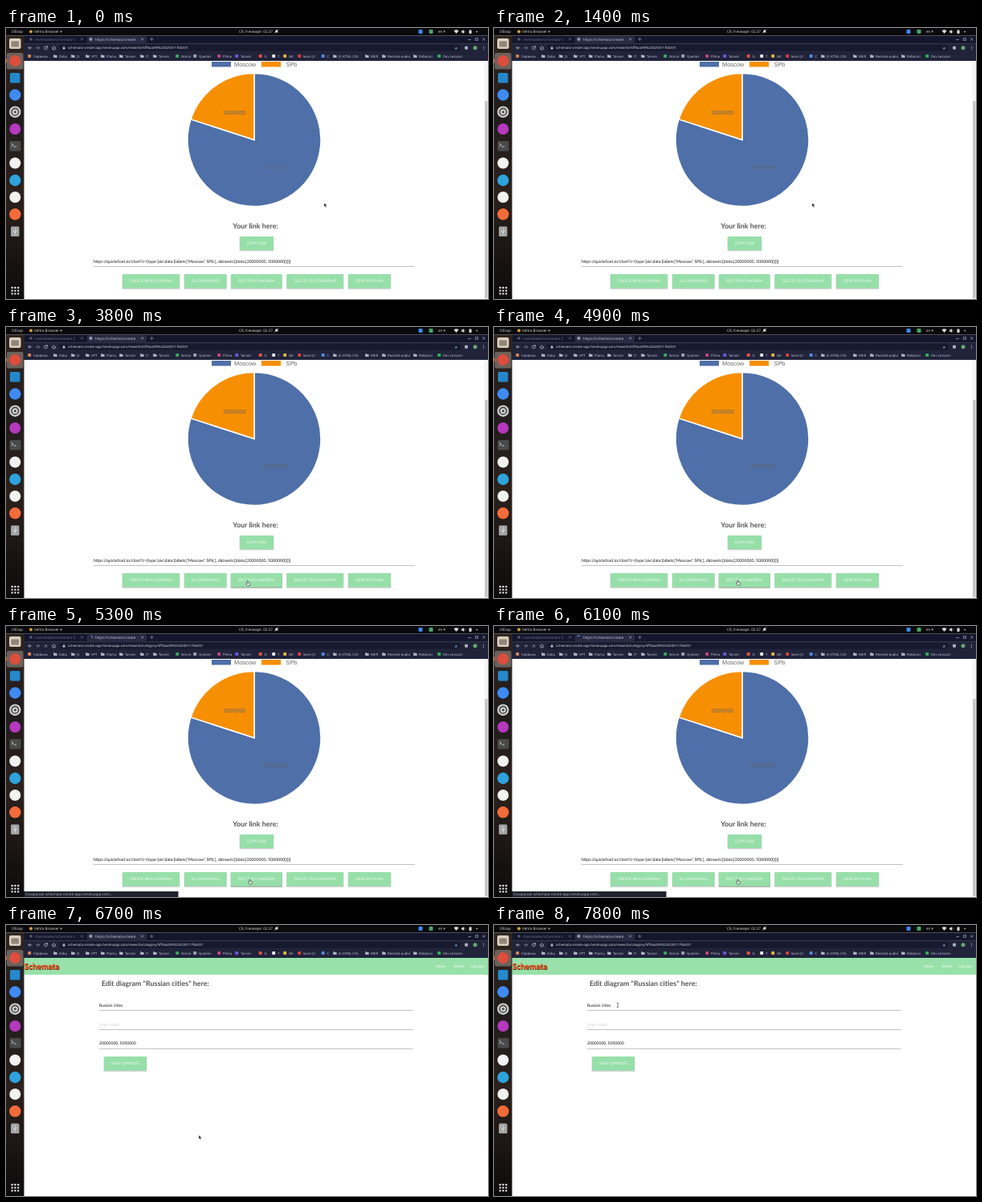
An HTML page that plays this animation: 600x338 px, repeating every 8 s.

```html
<!DOCTYPE html>
<html lang="ru">
<head>
<meta charset="utf-8">
<title>Chart editor</title>
<style>
  html, body { margin: 0; width: 100%; height: 100%; overflow: hidden; background: #fff; }
  svg { display: block; width: 600px; height: 338px; }
  text { font-family: "Open Sans", sans-serif; text-rendering: geometricPrecision; white-space: pre; }
  .lato { font-family: Lato, sans-serif; }
  .arial { font-family: "Liberation Sans", sans-serif; }
</style>
</head>
<body>
<svg id="stage" viewBox="0 0 600 338" xmlns="http://www.w3.org/2000/svg">
  <defs>
    <linearGradient id="wall" x2="0" y2="1">
      <stop offset="0" stop-color="#30251f"/>
      <stop offset=".3" stop-color="#211c1d"/>
      <stop offset=".6" stop-color="#2c211c"/>
      <stop offset="1" stop-color="#0c0b0c"/>
    </linearGradient>
    <clipPath id="view"><rect x="22" y="41" width="578" height="297"/></clipPath>
  </defs>
  <rect width="600" height="338" fill="#fff"/>
  <g id="chart" clip-path="url(#view)"></g>
  <g id="form" clip-path="url(#view)"></g>
  <g id="status"></g>
  <g id="browser"></g>
  <g id="dock"></g>
  <g id="cursor">
    <path id="arrow" d="M0 0V5.2L1.2 4.1L2 6L3 5.6L2.2 3.8H3.8Z" fill="#111" stroke="#fff" stroke-width=".5"/>
    <path id="beam" d="M-1.2-2.8Q0-2.8 0-2V2Q0 2.8-1.2 2.8M1.2-2.8Q0-2.8 0-2M0 2Q0 2.8 1.2 2.8" fill="none" stroke="#222" stroke-width=".6"/>
    <path id="hand" d="M-1.2-2.6Q-.6-3.4 0-2.6V-.7L2-.2Q2.6 0 2.5.8L2 3H-1L-2.6.8Q-2.4 0-1.2.6Z" fill="#fff" stroke="#222" stroke-width=".6"/>
  </g>
</svg>
<script>
const LOOP = 8000, STEP = 100;
const LOAD = 5000, OPEN = 6200, LEAVE = 6400;
const $ = id => document.getElementById(id);

function add(parent, tag, attrs, content) {
  const el = document.createElementNS("http://www.w3.org/2000/svg", tag);
  for (const key in attrs) el.setAttribute(key, attrs[key]);
  if (content) el.textContent = content;
  return parent.appendChild(el);
}
const rect = (p, x, y, width, height, fill, rx = 0) => add(p, "rect", { x, y, width, height, fill, rx });
const dot = (p, cx, cy, r, fill) => add(p, "circle", { cx, cy, r, fill });
const line = (p, d, stroke, width = .7) =>
  add(p, "path", { d, stroke, fill: "none", "stroke-width": width, "stroke-linecap": "round" });
const text = (p, x, y, size, fill, str, more = {}) =>
  add(p, "text", { x, y, "font-size": size, fill, ...more }, str);
const lato = (p, x, y, size, fill, str, more = {}) =>
  text(p, x, y, size, fill, str, { class: "lato", ...more });
const bold = { "font-weight": 700 };
const middle = { "text-anchor": "middle" };

function button(p, x, y, w, h, label) {
  const shadow = rect(p, x - .4, y + .5, w + .8, h + .7, "#9aa89e", 1);
  shadow.setAttribute("opacity", .55);
  rect(p, x, y, w, h, "#97dfa9", .8);
  lato(p, x + w / 2, y + h / 2 + 1.7, 4.8, "#f0fbf3", label, middle);
  return shadow;
}

// Chart page
const chart = $("chart");
const BLUE = "#4e6fa8", ORANGE = "#f78f02";
rect(chart, 256, 42, 24, 6.5, BLUE);
rect(chart, 318, 42, 24, 6.5, ORANGE);
text(chart, 284, 48, 7.4, "#666", "Moscow", { class: "arial" });
text(chart, 348.5, 48, 7.4, "#666", "SPb", { class: "arial" });

const CX = 309, CY = 139.5, R = 83;
function slice(from, to, fill) {
  const at = a => [CX + R * Math.cos(a * Math.PI / 180), CY + R * Math.sin(a * Math.PI / 180)].join(" ");
  const d = `M${CX} ${CY}L${at(from)}A${R} ${R} 0 ${+(to - from > 180)} 1 ${at(to)}Z`;
  add(chart, "path", { d, fill, stroke: "#fff", "stroke-width": 1.5 });
}
slice(-90, 198, BLUE);
slice(198, 270, ORANGE);
text(chart, 284.5, 108.2, 7.2, "#666", "5000000", { class: "arial", ...middle });
const bigLabel = text(chart, 335, 175.8, 7.2, "#626770", "20000000", { class: "arial", ...middle });

lato(chart, 310.5, 250, 8.9, "#545454", "Your link here:", { ...bold, ...middle });
button(chart, 291, 260, 42, 17, "COPY LINK");
lato(chart, 109, 292.5, 5.15, "#111",
  "https://quickchart.io/chart?c={type:'pie',data:{labels:['Moscow',' SPb',], datasets:[{data:[20000000, 5000000]}]}}");
rect(chart, 109, 297.2, 400, .7, "#a5a5a5");
button(chart, 145, 307, 71, 17.5, "CREATE NEW DIAGRAM");
button(chart, 222, 307, 52.5, 17.5, "ALL DRAWINGS");
const editShadow = button(chart, 280, 307, 63.5, 17.5, "EDIT THIS DIAGRAM");
button(chart, 349.5, 307, 70.5, 17.5, "DELETE THIS DIAGRAM");
button(chart, 426, 307, 53, 17.5, "SEND BY EMAIL");
rect(chart, 595.5, 41, 4.5, 297, "#f4f4f4");
rect(chart, 596.2, 91, 3.2, 246, "#c3c3c5");

// Form page
const form = $("form");
rect(form, 22, 41, 578, 297, "#fff");
rect(form, 22, 41, 578, 21, "#98e1aa");
lato(form, 23.3, 55.6, 10, "#57200c", "Schemata", bold);
lato(form, 22.7, 55, 10, "#fb4a12", "Schemata", bold);
[[534.5, "Home"], [557, "Admin"], [579, "Log Out"]].forEach(([x, s]) => lato(form, x, 53, 4.7, "#fff", s));
lato(form, 119, 75.5, 8.9, "#545454", 'Edit diagram "Russian cities" here:', bold);
[["Russian cities", "#111"], ["Enter labels", "#cfcfcf"], ["20000000, 5000000", "#111"]].forEach(([s, fill], i) => {
  lato(form, 116, 101.8 + i * 23.8, 5, fill, s);
  rect(form, 116, 106.3 + i * 23.8, 390.5, .7, "#a3a3a3");
});
button(form, 122, 164, 53, 17.5, "SAVE CHANGES");

// Status line
const HOST = "schemata-create-app.herokuapp.com";
const status = $("status");
rect(status, 22, 331, 192.5, 7, "#20222f");
text(status, 24, 336.3, 4.6, "#a9abb5", `Ожидание ${HOST}…`);

// Desktop bar and browser frame
const ui = $("browser");
const INK = "#c9ccda";
rect(ui, 0, 0, 600, 9.5, "#0a0a0c");
text(ui, 7, 6.1, 4.6, "#ddd", "Обзор");
dot(ui, 31, 4.5, 2, "#d9a13b");
text(ui, 35, 6.1, 4.6, "#ddd", "Veltra Browser ▾");
text(ui, 311, 6.1, 4.6, "#e4e4e4", "Сб, 9 января  02:27", middle);
add(ui, "path", { d: "M334.5 5.6Q335.3 5 335.3 3.4Q337 1 338.3 3.4Q338.3 5 339 5.6Z", fill: "#ddd" });
line(ui, "M334.3 6.4L339.3 1.6", "#ddd", .5);
rect(ui, 513.5, 2, 5, 5, "#3d87ee", 1);
rect(ui, 526.5, 2, 5, 5, "#49a66b", 1);
text(ui, 538, 6.1, 4.6, "#ddd", "en ▾");
add(ui, "path", { d: "M557.5 3.4Q560.5 .9 563.5 3.4L560.5 7Z", fill: "#ddd" });
add(ui, "path", { d: "M567 3.6H568.3L570 2.2V7L568.3 5.7H567Z", fill: "#ddd" });
line(ui, "M571 3.3Q572 4.6 571 5.9", "#ddd", .5);
rect(ui, 576.5, 2.4, 3, 4.6, "#ddd", .5);
text(ui, 585, 6.1, 4.2, "#ddd", "▾");

rect(ui, 22, 9.5, 578, 10, "#14172c");
rect(ui, 101, 10.3, 74, 9.2, "#272a42", 1.4);
rect(ui, 22, 19.2, 578, 21.8, "#20233a");
rect(ui, 66, 20.8, 500, 8, "#171a2e", 4);
dot(ui, 31, 14, 1.8, "#555b70");
text(ui, 36, 15.6, 4.5, "#70768d", "melnikodev/schemata-C");
text(ui, 111, 15.6, 4.5, "#d5d7e4", "https://schemata-create");
const cross = (x, y, r, c) => line(ui, `M${x - r} ${y - r}l${2 * r} ${2 * r}m0 ${-2 * r}l${-2 * r} ${2 * r}`, c, .6);
cross(94.5, 14, 1.1, "#8b90a6");
cross(169.7, 14, 1.1, INK);
line(ui, "M179.6 14H183.2M181.4 12.2V15.8", "#9a9fb5", .6);
line(ui, "M575.5 14.6H578.5", INK, .6);
line(ui, "M584.7 12.7H587.5V15.4H584.7Z", INK, .6);
cross(594.7, 14, 1.3, INK);

const icon = add(ui, "g", {});
dot(icon, 105.5, 14, 2, "#b9bdcb");
line(icon, "M103.7 14H107.3M105.5 12.2V15.8", "#454a62", .4);
const spinner = line(ui, "M105.5 11.9A2.1 2.1 0 0 1 107.6 14", "#7ea7ee", .8);

line(ui, "M32 24.8H28M29.7 23L28 24.8L29.7 26.6", INK);
line(ui, "M37.5 24.8H41.5M39.8 23L41.5 24.8L39.8 26.6", "#8f94a8");
const reload = line(ui, "M51.2 23.8A2 2 0 1 0 51.4 25.5M51.5 22.5V24H50", INK);
const stop = cross(49.5, 24.8, 1.5, INK);
line(ui, "M57.3 25L59.6 22.8L61.9 25M58.1 24.8V26.8H61.1V24.8", INK);
rect(ui, 70.7, 24.2, 2.8, 2.3, INK, .3);
line(ui, "M71.3 24V23.4Q72.1 22.3 72.9 23.4V24", INK, .5);
const address = text(ui, 77, 26.4, 4.25, "#e0e2ec", " ");
text(ui, 558, 26.7, 5, "#7f9fd8", "★");
rect(ui, 571, 22.8, 4, 4, "#a8adbf", 1);
dot(ui, 584, 24.8, 2.5, "#68a86d");
[23, 24.8, 26.6].forEach(y => dot(ui, 594.5, y, .5, INK));

const FOLDER = "#aeb4c6";
[
  [34, "Сервисы", "#d78157"], [66, "Zobu"], [88, "JS"], [106, "VPT"], [125, "Plamu"], [148, "Tarven"],
  [174, "IT"], [190, "Tarven"], [218, "Norvo", "#3ca55c"], [240, "Queries", "#9da3b5"],
  [270, "Plimo", "#c44578"], [292, "Tarven", "#7057d8"], [321.5, "G", "#e05243"], [338, "T", "#eee"],
  [352, "GK", "#e3b33e"], [370, "learn JS", "#d9403b"], [399.5, "C", "#4b8be0"], [414, "JS HTML CSS"],
  [454, "MKR"], [475, "Remote-audio"], [514, "Robotun"], [544, "Dev Lessons", "#2fae57"]
].forEach(([x, s, fill]) => {
  if (fill) rect(ui, x - 6.8, 33, 4, 4, fill, .9);
  else add(ui, "path", { d: `M${x - 6.8} 33.2h1.6l.6.7h2.2v3.2h-4.4Z`, fill: FOLDER });
  text(ui, x, 36.6, 4.25, INK, s);
});

// Dock
const dock = $("dock");
rect(dock, 0, 9.5, 22.5, 328.5, "url(#wall)");
rect(dock, 1, 31, 20.5, 20.5, "#6b625c", 2);
rect(dock, 0, 38.5, 1, 5, "#e45c20");
rect(dock, 4, 13, 14.5, 13, "#d9cfc0", 2);
rect(dock, 6.5, 16.5, 9.5, 7, "#8f8678", 1);
dot(dock, 11.3, 41, 7, "#dd4d3c");
rect(dock, 5, 56, 12.5, 12.5, "#2588cc", 1.5);
dot(dock, 11.3, 83.5, 7.2, "#3f8bf2");
dot(dock, 11.3, 104.7, 7.2, "#d4d4d4");
add(dock, "circle", { cx: 11.3, cy: 104.7, r: 4.3, fill: "none", stroke: "#444", "stroke-width": 1.6 });
dot(dock, 11.3, 104.7, 1.5, "#444");
dot(dock, 11.3, 126, 7, "#b538bd");
rect(dock, 4.5, 141, 14, 12.5, "#4a4a4b", 1.6);
line(dock, "M7 144.3L9 146L7 147.7M10 148H12.5", "#e8e8e8", .8);
dot(dock, 11.3, 168.5, 7, "#f2f2f2");
dot(dock, 11.3, 190, 7.2, "#2ea2dc");
dot(dock, 11.3, 211, 7, "#f0f3ef");
dot(dock, 11.3, 232.3, 7.2, "#f36b3a");
rect(dock, 6, 247.5, 10.5, 12.5, "#a2a3a4", 1.5);
line(dock, "M11.3 257V250M9 253L11.3 255.2L13.6 252.4", "#e5e5e5", .8);
for (let i = 0; i < 9; i++) rect(dock, 6.5 + i % 3 * 3.8, 322.7 + (i / 3 | 0) * 3.8, 2.2, 2.2, "#e2e2e2", .5);

// Pointer: time, x, y
const PATH = [
  [0, 396, 218], [2700, 396, 218], [2800, 389, 227], [3100, 347, 287.5], [3400, 279, 319],
  [3600, 296, 321], [3900, 304, 319], [6300, 304, 319], [6700, 240, 262], [7200, 168, 178],
  [7500, 157, 125], [7800, 154, 100], [LOOP, 154, 100]
];
function pointer(t) {
  const i = PATH.findIndex(p => p[0] > t);
  const [t0, x0, y0] = PATH[i - 1], [t1, x1, y1] = PATH[i];
  const k = (t - t0) / (t1 - t0);
  return [x0 + (x1 - x0) * k, y0 + (y1 - y0) * k];
}
const inside = (x, y, l, top, r, b) => x >= l && x <= r && y >= top && y <= b;
function shape(t, x, y) {
  if (t < LEAVE) {
    if (inside(x, y, 280, 307, 344, 325)) return "hand";
    return inside(x, y, 109, 284, 509, 298) ? "beam" : "arrow";
  }
  if (inside(x, y, 122, 164, 175, 182)) return "hand";
  return [94, 118, 142].some(top => inside(x, y, 116, top, 506, top + 13)) ? "beam" : "arrow";
}

const show = (el, on) => { el.style.display = on ? "" : "none"; };
const ID = "5ff9aa3995243200117bb031";

function draw(t) {
  const loading = t >= LOAD && t < OPEN;
  show(chart, t < OPEN);
  show(form, t >= OPEN);
  show(status, t >= LOAD && t < LEAVE + 200);
  show(icon, !loading);
  show(spinner, loading);
  show(reload, !loading);
  show(stop, loading);
  spinner.setAttribute("transform", `rotate(${(t - LOAD) * .36 - 90} 105.5 14)`);
  address.textContent = `${HOST}/newinfo/${t < LOAD ? "" : "category/"}${ID}`;
  bigLabel.setAttribute("opacity", t < 400 ? .6 : 1);

  const [x, y] = pointer(t), kind = shape(t, x, y);
  $("cursor").setAttribute("transform", `translate(${x} ${y})`);
  ["arrow", "beam", "hand"].forEach(id => show($(id), id === kind));
  editShadow.setAttribute("opacity", kind === "hand" ? .95 : .55);
}

const start = performance.now();
function tick() {
  const t = (performance.now() - start) % LOOP;
  draw(Math.floor(t / STEP) * STEP);
  requestAnimationFrame(tick);
}
tick();
</script>
</body>
</html>
```
